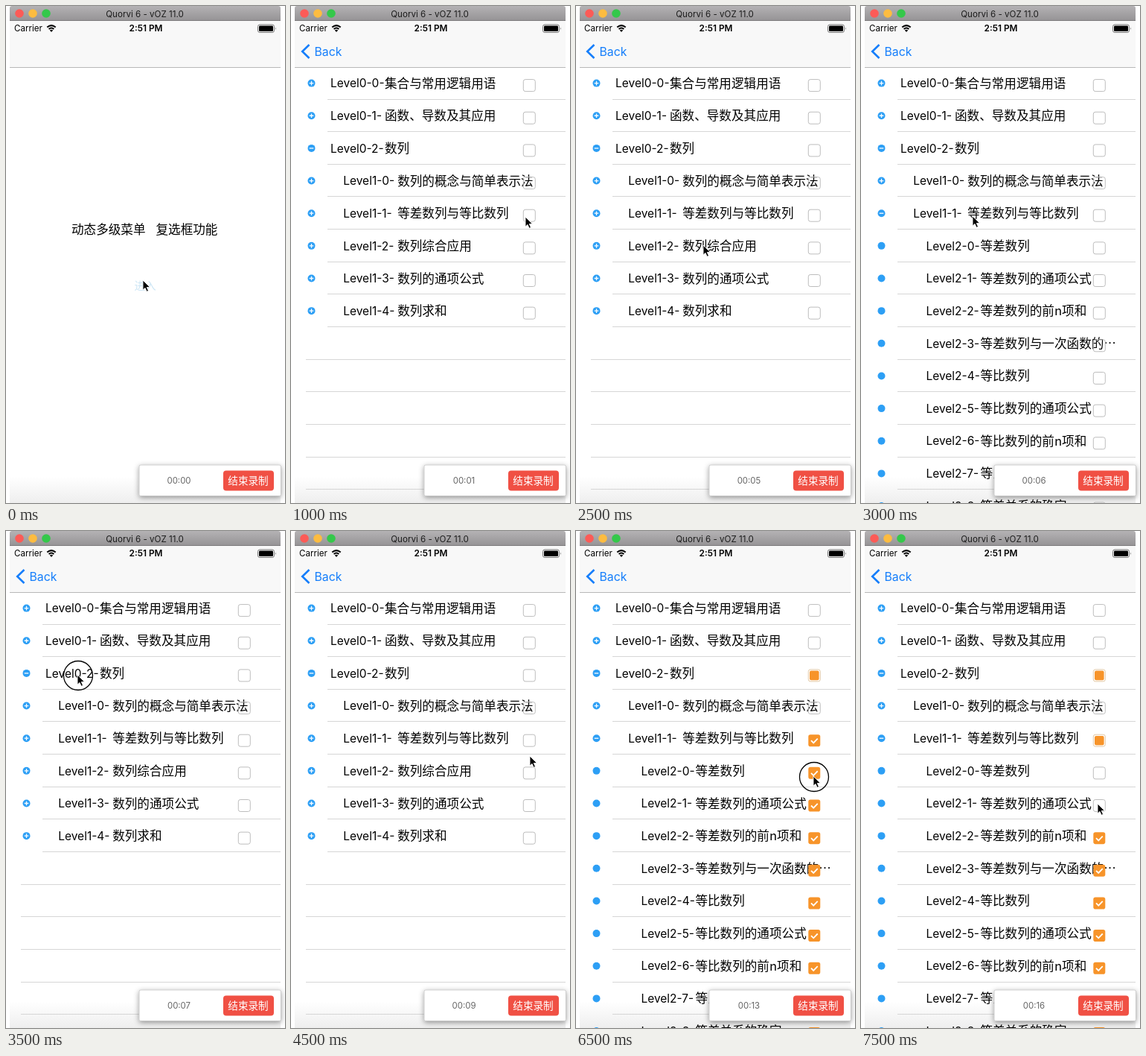
Write an HTML page that moves like this. It is 375 px wide and 667 px high and loops after 8 s.

```html
<!DOCTYPE html>
<html lang="zh">
<head>
<meta charset="utf-8">
<title>Tree menu</title>
<style>
html, body { margin: 0; width: 100%; height: 100%; overflow: hidden; background: #fff; }
svg { display: block; width: 375px; height: 667px; font-family: Inter, "Noto Sans CJK SC", "Noto Sans CJK", sans-serif; }
.cjk { font-family: "Noto Sans CJK SC", "Noto Sans CJK", sans-serif; font-size: 16.6px; }
.lat { font-size: 15.5px; }
.mid { text-anchor: middle; }
</style>
</head>
<body>
<svg viewBox="0 0 375 667">
  <defs>
    <linearGradient id="bar" x2="0" y2="1"><stop stop-color="#b4b2b4"/><stop offset="1" stop-color="#959395"/></linearGradient>
    <linearGradient id="fade" x2="0" y2="1"><stop stop-color="#fff"/><stop offset="1" stop-color="#eee"/></linearGradient>
    <filter id="shadow" x="-10%" y="-30%" width="120%" height="170%"><feDropShadow dx="0" dy="2" stdDeviation="3.5" flood-opacity=".4"/></filter>
  </defs>
  <rect x="5" y="632" width="364" height="35" fill="url(#fade)"/>
  <g id="page"></g>

  <rect x="5" y="20" width="364" height="62" fill="#f8f8f8"/>
  <path d="M5 82.5H369" stroke="#b8b8b8"/>
  <path d="M5 20V3Q5 0 8 0H366Q369 0 369 3V20Z" fill="url(#bar)"/>
  <path d="M5 19.5H369" stroke="#7d7b7d"/>
  <circle cx="18" cy="10" r="5.8" fill="#fc5b57"/>
  <circle cx="36" cy="10" r="5.8" fill="#fdbc40"/>
  <circle cx="54" cy="10" r="5.8" fill="#34c84a"/>
  <text class="mid" x="186.5" y="14.5" font-size="11.6" fill="#1c1c1c">Quorvi 6 - vOZ 11.0</text>
  <text x="11" y="34.2" font-size="11.6">Carrier</text>
  <text class="mid" x="188" y="34.2" font-size="11.8" font-weight="600">2:51 PM</text>
  <g fill="none" stroke="#000" stroke-width="2">
    <path d="M55.3 28.6Q61 23.6 66.7 28.6M57.6 31Q61 28 64.4 31"/>
  </g>
  <path d="M61 35l-2.2-2.4Q61 31 63.2 32.6Z"/>
  <rect x="338.5" y="25" width="22" height="10.5" rx="2.6" fill="none" stroke="#777"/>
  <rect x="340" y="26.5" width="19" height="7.5" rx="1.3"/>
  <path d="M362 28.5q1.8 1.7 0 3.5z" fill="#777"/>
  <g id="back">
    <path d="M24.5 52L15.2 61L24.5 70" fill="none" stroke="#157efb" stroke-width="2.6"/>
    <text x="31.5" y="66.6" font-size="15.8" fill="#157efb">Back</text>
  </g>

  <rect x="179" y="616" width="190.5" height="41.5" rx="2" fill="#fff" stroke="#bbb" stroke-width=".7" filter="url(#shadow)"/>
  <text id="timer" class="mid" x="232.5" y="641.3" font-size="11.4" fill="#666"></text>
  <rect x="292" y="623.5" width="68" height="27" rx="4" fill="#f05044"/>
  <text class="cjk mid" x="325.5" y="641.8" style="font-size:13.6px" font-weight="500" fill="#fff">结束录制</text>

  <circle id="ring" r="19.5" fill="none" stroke="#000" stroke-width="1.3"/>
  <path id="cursor" d="M0 0V13.2L3 10.4L5.2 15.3L7.5 14.3L5.3 9.6H9.6Z" stroke="#fff" stroke-width=".9"/>
</svg>
<script>
const $ = id => document.getElementById(id);
const STEP = 500, PITCH = 43.65;

const level0 = ['集合与常用逻辑用语', '函数、导数及其应用', '数列'];
const level1 = ['数列的概念与简单表示法', '等差数列与等比数列', '数列综合应用', '数列的通项公式', '数列求和'];
const level2 = ['等差数列', '等差数列的通项公式', '等差数列的前n项和', '等差数列与一次函数的…', '等比数列',
  '等比数列的通项公式', '等比数列的前n项和', '等比数列的性质', '等差关系的确定'];

// Each step: timer seconds, cursor x, y, open depth, checked leaves start (-1: none), ring
const steps = [
  [0, 184, 368, -1, -1, 0],
  [0, 140, 196, 0, -1, 0],
  [1, 315, 283, 1, -1, 0],
  [3, 225, 282, 2, -1, 0],
  [4, 185, 281, 2, -1, 0],
  [5, 171, 321, 1, -1, 0],
  [6, 150, 282, 2, -1, 0],
  [7, 96, 193, 1, -1, 1],
  [8, 98, 194, 0, -1, 0],
  [9, 321, 302, 1, -1, 0],
  [10, 319, 281, 1, 0, 0],
  [11, 240, 281, 1, 0, 0],
  [12, 290, 300, 2, 0, 0],
  [13, 319, 329, 2, 0, 1],
  [15, 319, 328, 2, 1, 0],
  [16, 318, 366, 2, 2, 0]
];

function treeRows(open, from) {
  const partial = from > 0 ? 'half' : 'full';
  const rows = level0.map((name, n) => ({ depth: 0, n, name, open: n == 2 && open > 0, mark: n == 2 && from >= 0 ? 'half' : '' }));
  if (open < 1) return rows;
  level1.forEach((name, n) => {
    const main = n == 1;
    rows.push({ depth: 1, n, name, open: main && open > 1, mark: main && from >= 0 ? partial : '' });
    if (main && open > 1) level2.forEach((name, n) =>
      rows.push({ depth: 2, n, name, mark: from >= 0 && n >= from ? 'full' : '' }));
  });
  return rows;
}

function checkbox(y, mark) {
  const frame = `<rect x="312.3" y="${y - 8}" width="16" height="16" rx="2.8" `;
  if (mark == 'full') return frame + `fill="#f7942a"/><path d="M316 ${y}l3.2 3.2l5.6-5.8" fill="none" stroke="#fff" stroke-width="1.8"/>`;
  const core = mark ? `<rect x="314" y="${y - 6.3}" width="12.6" height="12.6" rx="2" fill="#f7942a"/>` : '';
  return frame + `fill="none" stroke="${mark ? '#e3c9a5' : '#bdbdbd'}"/>` + core;
}

function drawRow(row, i) {
  const y = 103.6 + PITCH * i, x = 53 + 17.2 * row.depth;
  const sign = row.depth > 1 ? '' : `M24.7 ${y}h5.6` + (row.open ? '' : `M27.5 ${y - 2.8}v5.6`);
  return `<circle cx="27.5" cy="${y}" r="5" fill="#2d9ff5"/><path d="${sign}" stroke="#fff" stroke-width="1.3"/>
    <text class="lat" x="${x}" y="${y + 5.7}">Level${row.depth}-${row.n}-</text>
    <text class="cjk" x="${x + 73}" y="${y + 6}">${row.name}</text>` + checkbox(y + 3, row.mark);
}

function drawTree(open, from) {
  const rows = treeRows(open, from);
  let out = '';
  for (let i = 0; i < 13; i++) {
    const y = Math.floor(125 + PITCH * i) + .5;
    out += `<path d="M${i < rows.length ? 49 : 20} ${y}H369" stroke="#d6d6d6"/>`;
  }
  return out + rows.map(drawRow).join('');
}

const home = `<text class="cjk" x="88" y="306">动态多级菜单</text><text class="cjk" x="201.5" y="306">复选框功能</text>
  <text class="cjk mid" x="187" y="380.5" style="font-size:14.6px" fill="#cde6f5">进入</text>`;

let shown = -1;
function tick(now) {
  const k = Math.floor(now / STEP) % steps.length;
  if (k != shown) {
    shown = k;
    const [sec, x, y, open, from, ring] = steps[k];
    $('page').innerHTML = open < 0 ? home : drawTree(open, from);
    $('back').style.display = open < 0 ? 'none' : '';
    $('timer').textContent = '00:' + String(sec).padStart(2, '0');
    $('cursor').setAttribute('transform', `translate(${x} ${y})`);
    $('ring').setAttribute('transform', `translate(${x + 1} ${y + 1})`);
    $('ring').style.display = ring ? '' : 'none';
  }
  requestAnimationFrame(tick);
}
tick(performance.now());
</script>
</body>
</html>
```
